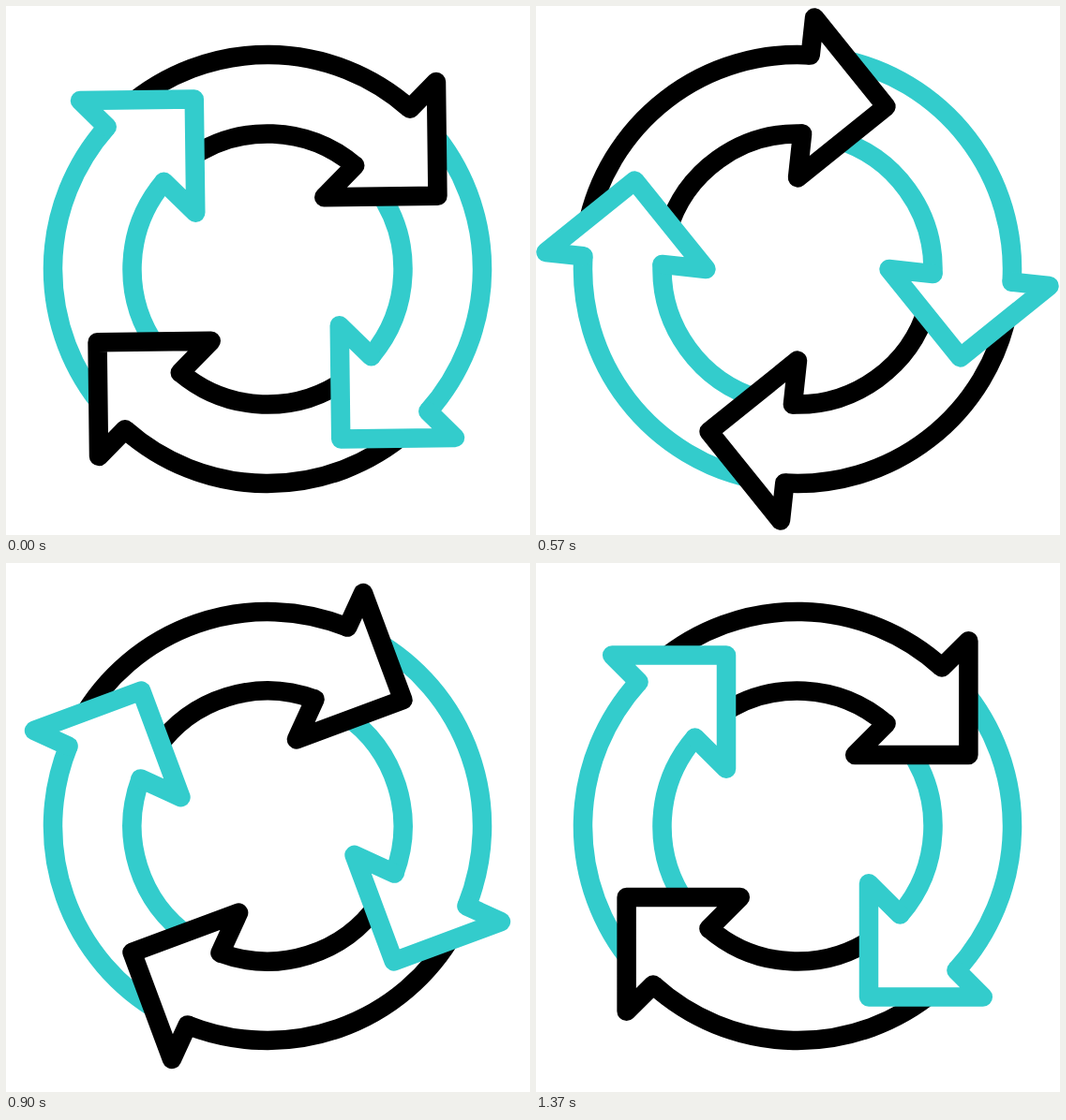
An HTML page for the animation above (1.67 s loop, 559 by 565 pixels).

```html
<!DOCTYPE html>
<html lang="en">
<head>
<meta charset="utf-8">
<title>Turning arrows</title>
<style>
  html, body { margin: 0; width: 100%; height: 100%; overflow: hidden; background: #fff; }
  svg { display: block; width: 559px; height: 565px; }
  path { stroke-width: 20.5; stroke-linecap: round; stroke-linejoin: round; }
  .tail { fill: none; stroke-linecap: butt; }
  .head { fill: #fff; }
</style>
</head>
<body>
<svg viewBox="0 0 559 565">
  <g transform="translate(279 281)"><g id="ring"></g></g>
</svg>
<script>
const COLORS = ['#000', '#3cc'];
const LOOP = 1670, FPS = 30, LAST = 41;
const OUTER = 229, INNER = 144.5;

const ring = document.getElementById('ring');

function point(r, deg) {
  const a = deg * Math.PI / 180;
  return (r * Math.cos(a)).toFixed(2) + ' ' + (r * Math.sin(a)).toFixed(2);
}

const arc = (r, from, to) => `M${point(r, from)}A${r} ${r} 0 0 1 ${point(r, to)}`;

const TAIL = arc(OUTER, -130, -47.7) + arc(INNER, -125, -49.1);
const HEAD = 'M154-169.4L182.4-197.8V-76H61.2L94.6-109.4';

function addPath(kind, d, i) {
  const p = document.createElementNS('http://www.w3.org/2000/svg', 'path');
  p.setAttribute('class', kind);
  p.setAttribute('d', d);
  p.setAttribute('stroke', COLORS[i % 2]);
  p.setAttribute('transform', `rotate(${i * 90})`);
  ring.append(p);
}

// Every head covers the start of the next tail.
for (let i = 0; i < 4; i++) addPath('tail', TAIL, i);
for (let i = 0; i < 4; i++) addPath('head', HEAD, i);

// Cubic ease with handles (.45, 0) and (.55, 1).
function ease(x) {
  if (x <= 0) return 0;
  if (x >= 1) return 1;
  let lo = 0, hi = 1, t = 0.5;
  for (let i = 0; i < 30; i++) {
    t = (lo + hi) / 2;
    const bx = 3 * (1 - t) * t * ((1 - t) * 0.45 + t * 0.55) + t ** 3;
    if (bx < x) lo = t; else hi = t;
  }
  return t * t * (3 - 2 * t);
}

// Wind up backwards, then swing one full turn forward: [step, angle].
const KEYS = [[-1.2, 0], [12.88, -55.5], [40.58, 360]];

function angleAt(step) {
  const k = step < KEYS[1][0] ? 0 : 1;
  const [s0, a0] = KEYS[k], [s1, a1] = KEYS[k + 1];
  return a0 + (a1 - a0) * ease((step - s0) / (s1 - s0));
}

function draw(ms) {
  const t = Math.floor((ms % LOOP) / 10) * 10;
  const step = Math.min(LAST, Math.floor((t + 3.4) * FPS / 1000));
  ring.setAttribute('transform', `rotate(${angleAt(step).toFixed(3)})`);
}

let start;
function tick(now) {
  start ??= now;
  draw(Math.max(0, now - start));
  requestAnimationFrame(tick);
}
draw(0);
requestAnimationFrame(tick);
</script>
</body>
</html>
```
